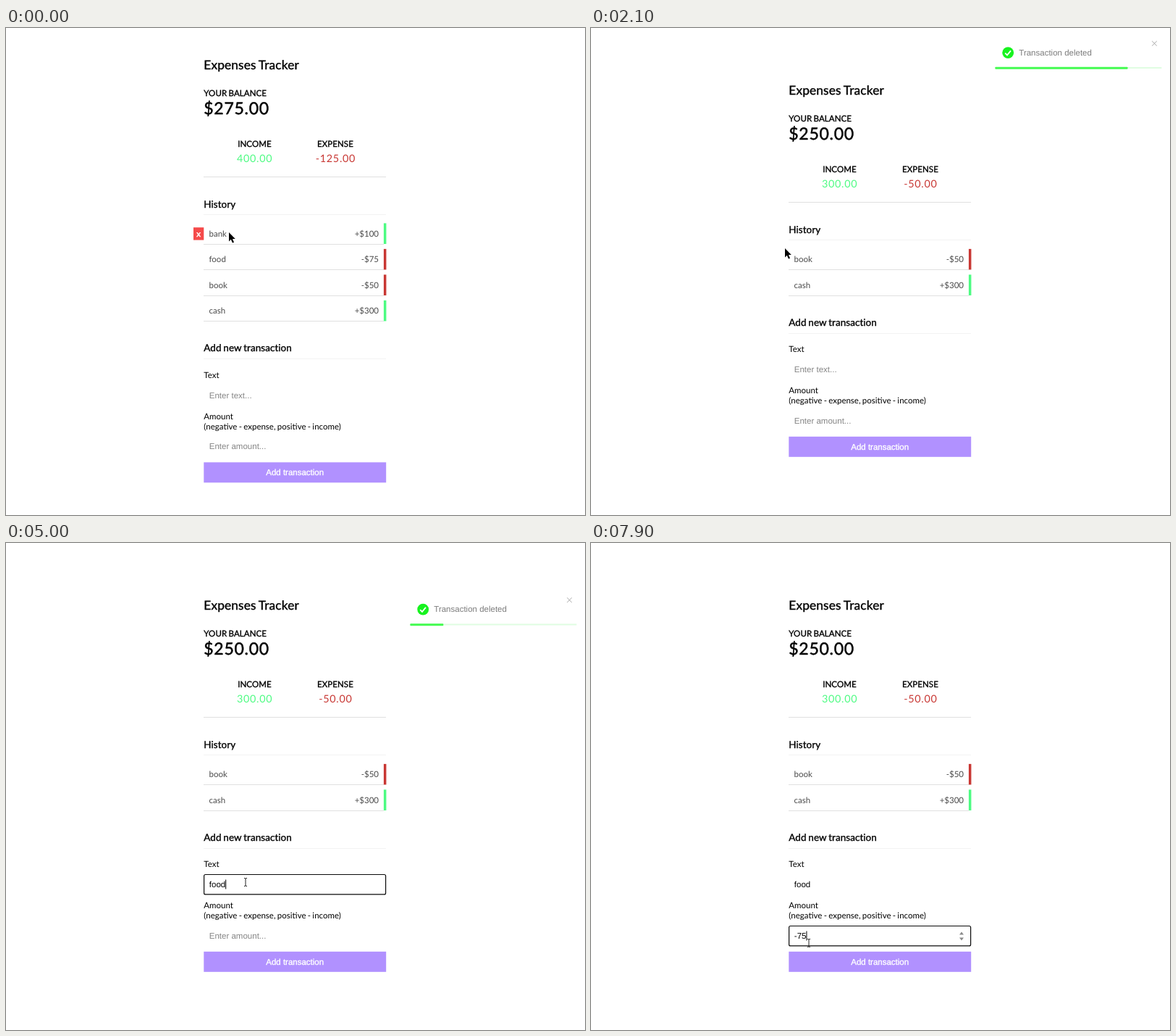
Recreate the animation shown at these times as an HTML page. Size 800x672 px, loop 8 s.

```html
<!DOCTYPE html>
<html lang="en">
<head>
<meta charset="utf-8">
<title>Expenses Tracker</title>
<style>
html, body { margin: 0; width: 100%; height: 100%; overflow: hidden; background: #fff; }
svg { display: block; width: 100%; height: 100%; }
text { font: 11.5px Lato, sans-serif; word-spacing: -.055em; text-rendering: geometricPrecision; white-space: pre; }
.bold { stroke: #000; stroke-width: .35px; letter-spacing: .006em; }
.title { font-size: 17.25px; letter-spacing: .01em; stroke-width: .4px; }
.balance { font-size: 23px; letter-spacing: .72px; stroke-width: .5px; }
.heading { font-size: 13.455px; }
.mid { text-anchor: middle; }
.end { text-anchor: end; }
.money { font-size: 14.375px; letter-spacing: .72px; }
.plus { fill: #4dfb82; }
.minus { fill: #c83733; }
.row text { fill: #4a4a4a; }
.row .x { fill: #fff; stroke: #fff; stroke-width: .5px; }
.line { fill: #e0e0e0; shape-rendering: crispEdges; }
.faint { fill: #f3f3f3; shape-rendering: crispEdges; }
.ui { font-family: "Liberation Sans", Arial, sans-serif; word-spacing: 0; }
.hint { fill: #858585; }
.focus { fill: none; stroke: #0a0a0a; stroke-width: 1.2px; }
</style>
</head>
<body>
<svg viewBox="0 0 800 672">
  <g id="top">
    <text class="bold title" x="273.3" y="57">Expenses Tracker</text>
    <text class="bold" x="273.3" y="94">YOUR BALANCE</text>
    <text class="bold balance" id="balance" x="273.3" y="119"></text>
    <text class="bold mid" x="343.4" y="164">INCOME</text>
    <text class="money plus mid" id="income" x="343.6" y="184.8"></text>
    <text class="bold mid" x="455" y="164">EXPENSE</text>
    <text class="money minus mid" id="expense" x="455.4" y="184.8"></text>
    <rect class="line" x="273.3" y="205" width="251.6" height="1"/>
    <text class="bold heading" x="273.3" y="247.6">History</text>
    <rect class="faint" x="273.3" y="257" width="251.6" height="1"/>
  </g>
  <g id="rows"></g>
  <g id="form">
    <text class="bold heading" x="273.3" y="446">Add new transaction</text>
    <rect class="faint" x="273.3" y="456" width="251.6" height="1"/>
    <text x="273.3" y="482.6">Text</text>
    <text class="ui" id="name" x="280.8" y="510.5"></text>
    <text x="273.3" y="539.8">Amount</text>
    <text x="273.3" y="553.6">(negative - expense, positive - income)</text>
    <text class="ui" id="amount" x="280.8" y="581.4"></text>
    <rect x="273.3" y="599.3" width="251.9" height="28" fill="#b191ff"/>
    <text class="ui mid" x="399.2" y="617" fill="#fff" stroke="#fff" stroke-width=".35">Add transaction</text>
    <rect class="focus" id="focus" x="273.6" width="251" height="27.4" rx="2"/>
    <rect id="caret" width="1" height="13"/>
    <path id="spinner" d="M509 576l3-4 3 4zM509 580l3 4 3-4z" fill="#8a8a8a"/>
  </g>
  <g id="toasts"></g>
  <g id="cursor">
    <path id="arrow" d="M0 0V12.4L2.8 9.8 4.9 14.6 7 13.7 5 9.1H8.8Z" stroke="#fff" stroke-width=".8" paint-order="stroke"/>
    <path id="hand" d="M-1.3 1.2Q0-.8 1.2 1.2V6Q2.6 5 3.4 6.4 4.6 5.7 5.2 7.2 6.6 7 6.4 9V12L5 15.7H-1.6L-4.6 10.6Q-4.8 8.8-3 9.4L-1.3 11Z M1.2 6V8.6M3.4 6.4V9M5.2 7.2V9.3" fill="#fff" stroke="#444" stroke-width=".75"/>
    <path id="ibeam" d="M-2-5.6Q0-5.6 0-4.4 0-5.6 2-5.6M0-4.6V4.6M-2 5.6Q0 5.6 0 4.4 0 5.6 2 5.6" fill="none" stroke="#222" stroke-width="1"/>
  </g>
</svg>
<script>
const $ = id => document.getElementById(id);
const LOOP = 8000, SHIFT = 17.74, PITCH = 35.48;
const DELETES = [800, 1900];
const TOTALS = [
  ['$275.00', '400.00', '-125.00'],
  ['$175.00', '300.00', '-125.00'],
  ['$250.00', '300.00', '-50.00']
];
const ITEMS = [['bank', '+$100'], ['food', '-$75'], ['book', '-$50'], ['cash', '+$300']];
const CURSOR_PATH = [
  [0, 308, 282], [100, 308, 282], [580, 266, 282], [1050, 266, 282], [1400, 273.3, 297],
  [1650, 268, 300], [2000, 268, 304], [2250, 268, 304], [3000, 331, 468],
  [5050, 331, 468], [5500, 265, 537], [5620, 265, 537], [5880, 301, 552]
];
const CURSOR_KIND = [[0, 'arrow'], [540, 'hand'], [1000, 'arrow'], [1380, 'hand'],
  [1950, 'arrow'], [2950, 'ibeam'], [5250, 'arrow'], [5720, 'ibeam']];
const NAME = [[0, ''], [4200, 'f'], [4400, 'fo'], [4550, 'foo'], [4700, 'food']];
const AMOUNT = [[0, ''], [7000, '-'], [7900, '-75']];
const NAME_FOCUS = 3100, AMOUNT_FOCUS = 5900, HOVER = 1430;
const TOAST_STARTS = [790, 1900], TOAST_LIFE = 3000, TOAST_ENTER = 700;
const TOAST_PATH = [[0, 2156], [420, -18], [525, 7.2], [630, -3.6], [700, 0],
  [3700, 0], [3820, -14], [4300, 1436]];

const clamp = v => Math.max(0, Math.min(1, v));
const easeOut = u => 1 - (1 - u) ** 3;
const smooth = u => u * u * (3 - 2 * u);
// Close to the CSS "ease" curve.
const cssEase = u => 1 - (1 - u ** 1.25) ** 2.2;
const latest = (steps, t) => steps.filter(s => s[0] <= t).pop();
const move = (el, x, y) => el.setAttribute('transform', `translate(${x} ${y})`);
const show = (el, on) => { el.style.display = on ? '' : 'none'; };

function along(path, t, ease) {
  const next = path.findIndex(p => p[0] > t);
  if (next < 0) return path[path.length - 1].slice(1);
  const a = path[next - 1], b = path[next];
  const u = ease((t - a[0]) / (b[0] - a[0]));
  return a.slice(1).map((v, i) => v + (b[i + 1] - v) * u);
}

$('rows').innerHTML = ITEMS.map(([label, sum]) => `<g class="row">
  <rect class="line" x="273.3" y="28.4" width="249" height="1"/>
  <rect class="${sum[0] === '+' ? 'plus' : 'minus'}" x="521.9" width="3.5" height="28.6"/>
  <text x="280.5" y="18.6">${label}</text>
  <text class="end" x="515" y="18.6">${sum}</text>
  <g class="delete"><rect x="259" y="5.8" width="14.3" height="17.4" fill="#f54a4a"/>
  <text class="mid x" x="266.1" y="18.4">x</text></g></g>`).join('');

$('toasts').innerHTML = TOAST_STARTS.map(() => `<g>
  <circle cx="576.2" cy="34.2" r="7.9" fill="#17f31f"/>
  <path d="M572.2 34.6l2.8 2.8 5-6" fill="none" stroke="#fff" stroke-width="1.7"/>
  <text class="ui" x="591.3" y="37.9" fill="#7c7c7c">Transaction deleted</text>
  <path d="M775.2 18l6.6 6.6m0-6.6l-6.6 6.6" stroke="#a8a8a8" stroke-width="1"/>
  <rect x="558.4" y="54" width="230" height="2" fill="#e0fde2"/>
  <rect class="bar" x="558.4" y="53.8" height="3" rx=".8" fill="#43fb50"/></g>`).join('');

const rows = [...$('rows').children], toasts = [...$('toasts').children];

function renderHistory(t) {
  const gone = DELETES.filter(d => t >= d).length;
  ['balance', 'income', 'expense'].forEach((id, i) => { $(id).textContent = TOTALS[gone][i]; });
  move($('top'), 0, SHIFT * gone);
  move($('form'), 0, -SHIFT * gone);
  const reveal = [1, clamp((t - HOVER) / 300), 0, 0];
  rows.forEach((row, i) => {
    show(row, i >= gone);
    move(row, 0, 269.4 + SHIFT * gone + PITCH * (i - gone));
    row.querySelector('.delete').style.opacity = reveal[i];
  });
}

function fillField(id, value, hint) {
  $(id).textContent = value || hint;
  $(id).classList.toggle('hint', !value);
}

function renderForm(t) {
  const [nameTime, name] = latest(NAME, t), amount = latest(AMOUNT, t)[1];
  fillField('name', name, 'Enter text...');
  fillField('amount', amount, 'Enter amount...');
  const onAmount = t >= AMOUNT_FOCUS, focused = t >= NAME_FOCUS;
  const blinkOn = (t - Math.max(nameTime, NAME_FOCUS)) % 1000 < 500;
  const value = onAmount ? amount : name;
  const width = value ? $(onAmount ? 'amount' : 'name').getComputedTextLength() : 0;
  show($('focus'), focused);
  show($('spinner'), onAmount);
  show($('caret'), focused && (onAmount || blinkOn));
  $('focus').setAttribute('y', onAmount ? 564 : 493);
  $('caret').setAttribute('x', 280.8 + width);
  $('caret').setAttribute('y', onAmount ? 571 : 500);
}

function renderToasts(t) {
  const collapse = smooth(clamp((t - 5190) / 300));
  toasts.forEach((toast, i) => {
    const age = t - TOAST_STARTS[i];
    const visible = age >= 0 && age < 4300;
    show(toast, visible);
    if (!visible) return;
    move(toast, along(TOAST_PATH, age, age < 3700 ? easeOut : cssEase)[0], i * 57.5 * (1 - collapse));
    toast.style.opacity = Math.min(clamp(age / 420), 1 - clamp((age - 3820) / 480));
    const left = 1 - clamp((age - TOAST_ENTER) / TOAST_LIFE);
    toast.querySelector('.bar').setAttribute('width', 230 * left);
  });
}

function renderCursor(t) {
  const kind = latest(CURSOR_KIND, t)[1];
  ['arrow', 'hand', 'ibeam'].forEach(id => show($(id), id === kind));
  move($('cursor'), ...along(CURSOR_PATH, t, smooth));
}

const start = performance.now();
function frame() {
  const t = (performance.now() - start) % LOOP;
  renderHistory(t);
  renderForm(t);
  renderToasts(t);
  renderCursor(t);
  requestAnimationFrame(frame);
}
frame();
</script>
</body>
</html>
```
